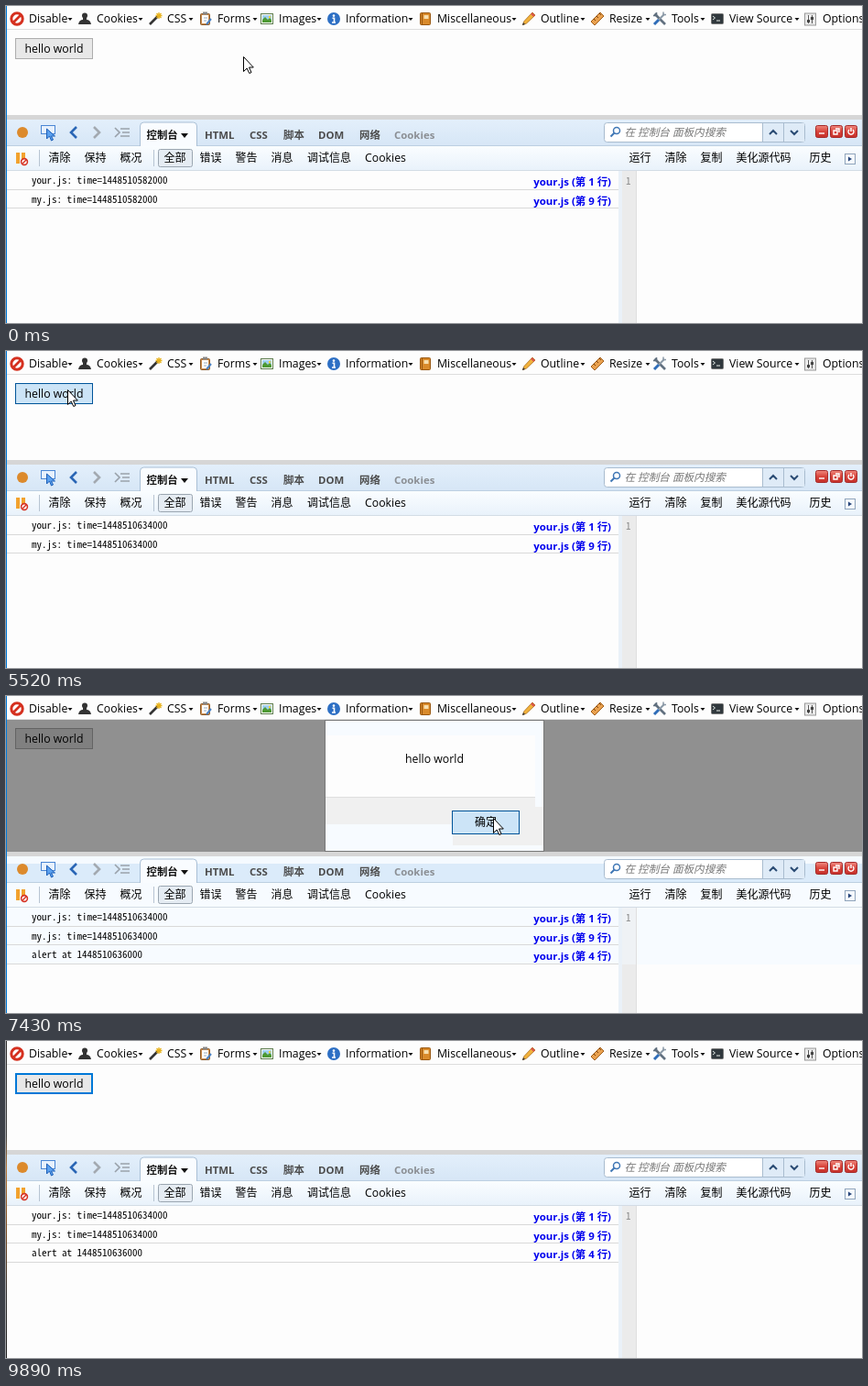
An HTML page that plays this animation: 935 by 346 pixels, repeating every 9990 ms.

```html
<!DOCTYPE html>
<html lang="zh-CN">
<head>
<meta charset="utf-8">
<title>Console demo</title>
<style>
html, body { margin: 0; width: 100%; height: 100%; overflow: hidden; background: #fdfdfd; }
svg { display: block; }
text { font: 12.3px "Open Sans", "Noto Sans CJK SC", "Noto Sans CJK", sans-serif; fill: #000; white-space: pre; }
.cjk { font-size: 12px; }
.tab { font-size: 11.4px; font-weight: 700; fill: #4c4c4c; }
.link { font-size: 11.45px; font-weight: 700; fill: #00e; text-anchor: end; }
.log { font: 11px "Noto Sans Mono CJK SC", "Noto Sans Mono", "Liberation Mono", monospace; font-size-adjust: ch-width .5; fill: #000; }
.hint { font-size: 11.6px; font-style: italic; fill: #777; }
.mid { text-anchor: middle; }
</style>
</head>
<body>
<script>
const LOOP = 9990, OPEN = 5650, CLOSE = 7550;

const text = (x, y, s, cls = '', attrs = '') => `<text x="${x}" y="${y}" class="${cls}" ${attrs}>${s}</text>`;
const rect = (x, y, w, h, fill, attrs = '') => `<rect x="${x}" y="${y}" width="${w}" height="${h}" fill="${fill}" ${attrs}/>`;
const path = (d, stroke, width = 1, fill = 'none') => `<path d="${d}" stroke="${stroke}" stroke-width="${width}" fill="${fill}"/>`;
const dot = (x, y, r, fill, attrs = '') => `<circle cx="${x}" cy="${y}" r="${r}" fill="${fill}" ${attrs}/>`;
const box = (x, y, w, h, fill, stroke, width = 1, r = 0) =>
  rect(x + width / 2, y + width / 2, w - width, h - width, fill, `stroke="${stroke}" stroke-width="${width}" rx="${r}"`);
const caret = (x, y, half = 2.5, drop = 3) => path(`M${x - half} ${y}h${half * 2}l${-half} ${drop}z`, 'none', 0, '#111');
const move = (x, y, s) => `<g transform="translate(${x} ${y})">${s}</g>`;
const at = (from, to, s) => `<g class="timed" data-from="${from}" data-to="${to}">${s}</g>`;
const gradient = (id, ...stops) => `<linearGradient id="${id}" x2="0" y2="1">` +
  stops.map(([o, c]) => `<stop offset="${o}" stop-color="${c}"/>`).join('') + '</linearGradient>';

// Toolbar icons are drawn around their own centre.
const icons = {
  disable: dot(0, 0, 6.2, '#fff', 'stroke="#d5301f" stroke-width="3"') + path('M-4 4L4-4', '#d5301f', 2.6),
  person: dot(0, -3.6, 3, '#333') + path('M-2-1h4v2q4 0 5 5H-7q1-5 5-5z', 'none', 0, '#333'),
  wand: path('M-6 6L3-3', '#333', 2.6) + path('M4-7v7M.5-3.5h7M1.5-6l5 5M6.5-6l-5 5', '#e8b21c', 1.3),
  clipboard: box(-6, -6, 11, 13, '#c98a4b', '#8a5a2b', 1, 1) + rect(-4, -4, 7, 9, '#fff') +
    rect(-3, -7.5, 5, 3, '#888') + path('M-2-1h4M-2 2h3', '#9ab', 1) + path('M1 6l5-6', '#4a82c3', 2),
  image: box(-7, -6, 14, 12, '#fff', '#5d7c4d') + rect(-5, -4, 10, 8, '#9fd0ef') +
    path('M-5 4v-3l3-3 3 3 2-2 2 2v3z', 'none', 0, '#4e9a34') + dot(3, -2, 1.2, '#f4d142'),
  info: dot(0, 0, 7, '#2d6fc4') + dot(0, -3.4, 1.3, '#fff') + path('M-1.5-.7h2V4M-2 4h4', '#fff', 1.6),
  book: box(-6, -7, 12, 14, '#d98a2b', '#98560f', 1, 1) + path('M-3.5-6.5v13', '#98560f') + rect(-1.5, -4, 5, 4, '#f8dfae'),
  pencil: path('M-6.5 6.5l1.5-4L4-7l3 3-9.5 9z', '#a86b18', .8, '#f2b23c') + path('M3-6l3 3', '#d9534a', 2.4) + path('M-7 7l1-3 2 2z', 'none', 0, '#333'),
  ruler: path('M-7 3L3-7l4 4L-3 7z', '#a05f1c', 1, '#e9a14f') + path('M-4 0l2 2M-1-3l2 2M2-6l2 2', '#7d430b', 1),
  tools: path('M-5.5-5.5L6 6', '#61707f', 2.6) + path('M5-5L-1 1', '#8a98a6', 2) + path('M-1 1l-5 5', '#2f6db8', 3) +
    path('M-7-3.5l3.5 0 0-3.5', '#61707f', 1.6) + path('M4-7.5l0 3 3 0', '#8a98a6', 1.5),
  terminal: box(-7, -6, 14, 12, '#30383d', '#777', 1, 1) + path('M-5-3l2.5 2-2.5 2M-1 2h4', '#e8eee8', 1),
  options: box(-7, -6.5, 13, 14, '#e9e9e9', '#999') + rect(-4, -3, 3, 8, '#fff') + path('M-2.5-4V5M1.5-4V5', '#555', 1) +
    rect(-4, 1, 3, 3, '#444') + rect(0, -2, 3, 3, '#444'),
};

const menu = [
  ['disable', 12, 'Disable', 70], ['person', 86, 'Cookies', 147], ['wand', 163, 'CSS', 202], ['clipboard', 218, 'Forms', 272],
  ['image', 285, 'Images', 342], ['info', 358, 'Information', 442], ['book', 458, 'Miscellaneous', 555], ['pencil', 571, 'Outline', 630],
  ['ruler', 646, 'Resize', 701], ['tools', 714, 'Tools', 761], ['terminal', 777, 'View Source', 864], ['options', 879, 'Options', 945],
].map(([icon, x, label, arrow]) =>
  move(x, 14, icons[icon]) + text(x + 13, 18, label) + caret(arrow, 13)).join('');

const pageButton = (fill, stroke, width) => box(10, 35, 85, 23, fill, stroke, width) + text(52.5, 51, 'hello world', 'mid');
const page =
  at(0, 4940, pageButton('#e8e8e8', '#adadad', 1)) +
  at(4940, 5520, pageButton('#e5f1fb', '#0078d7', 1)) +
  at(5520, OPEN, pageButton('#cce4f7', '#005499', 1)) +
  at(OPEN, CLOSE, pageButton('#e1e1e1', '#adadad', 1)) +
  at(CLOSE, LOOP, pageButton('#e8e8e8', '#0078d7', 2));

const loading =
  rect(1, 97, 668, 22, '#f0f0f0') + rect(1, 180, 668, 166, '#f0f0f0') +
  rect(1, 97, 264, 22, 'url(#status)') + path('M1 97.5H264.5V119', '#cdcdcd') +
  at(1260, 1560, text(5, 113, '正在等待 cdnjs.cloudflare.com...', 'cjk')) +
  at(1560, 3990, text(5, 113, '正在传输来自 cdnjs.cloudflare.com 的数据...', 'cjk'));

const logRow = (i, message, line) => {
  const offset = i * 20.5, y = Math.round(offset);
  return text(28, 194 + y, message, 'log') + text(661, 196 + y, `your.js (第 ${line} 行)`, 'link') +
    rect(1, 200 + Math.floor(offset), 668, 1, '#d9d9d9');
};
const loadRows = time => logRow(0, `your.js: time=${time}`, 1) + logRow(1, `my.js: time=${time}`, 9);

const tabs = [[217, 'HTML'], [266, 'CSS'], [303, '脚本'], [341, 'DOM'], [386, '网络']]
  .map(([x, s]) => text(x, 145, s, 'tab')).join('') + text(424, 145, 'Cookies', 'tab', 'style="fill:#8b8f94"');

const commands = [[47, '清除'], [86, '保持'], [125, '概况'], [173, '全部'], [212, '错误'], [251, '警告'], [290, '消息'], [329.5, '调试信息'],
  [681, '运行'], [720, '清除'], [759, '复制'], [798, '美化源代码'], [878, '历史']]
  .map(([x, s]) => text(x - .5, 170, s, 'cjk')).join('') + text(392, 170, 'Cookies');

const windowButtons = ['M-3 2h6', 'M-3-1h4v4h-4zM-1-3h4v4', 'M-2-2a3 3 0 1 0 4 0M0-4v4']
  .map((d, i) => move(891 + i * 16, 137, box(-7, -7, 14, 14, 'url(#red)', '#a52a2a', 1, 2) + path(d, '#fff', 1.4))).join('');

const navIcons =
  dot(18, 138, 6, '#dc8a2c') +
  box(38, 130, 16, 10, '#e7f1fd', '#4a86d4') + path('M44.5 134v11l3-3 2 5 2-1-2-4h4z', '#1d5fb8', 1, '#5ba0ee') +
  path('M77 132l-6 6 6 6', '#2a66b5', 2.6) + path('M96 132l6 6-6 6', '#a3a9b0', 2.6) +
  path('M119 133l5 5-5 5M125 134h10M127 138h8M125 142h10', '#9aa2ab', 1.7);

const pauseIcon = rect(11, 160, 4, 12, '#f2a22e') + rect(17, 160, 4, 8, '#f2a22e') +
  dot(20, 170, 3.4, '#fff', 'stroke="#d63324" stroke-width="1.6"') + path('M18 172l4-4', '#d63324', 1.4);

const search =
  box(653, 127, 220, 22, '#fff', '#a9bccf', 1, 3) + rect(827, 128, 45, 20, '#dfebf7') +
  path('M826.5 128v20M849.5 128v20', '#a9bccf') +
  dot(667, 136, 3.5, '#fff', 'stroke="#3f77b5" stroke-width="1.5"') + path('M664.5 138.5l-4 4', '#3f77b5', 2) +
  text(675.5, 142, '在 控制台 面板内搜索', 'hint') +
  path('M834 140l4-4 4 4M857 136l4 4 4-4', '#2b4c74', 2);

const panel =
  rect(1, 119, 934, 5, '#d6d6d6') + rect(1, 124, 934, 29, 'url(#tabbar)') + rect(1, 153, 934, 26, 'url(#toolbar)') +
  at(OPEN, CLOSE, rect(1, 124, 934, 8, '#f5faff') + rect(1, 132, 934, 20, '#dbebfa') + rect(1, 153, 934, 26, '#f7fbff')) +
  rect(1, 152, 934, 1, '#bccfe1') + rect(1, 179, 934, 1, '#d3dce5') +
  path('M146.5 153v-22q0-4 4-4h54q4 0 4 4v22', '#a9bfd5', 1, '#f9fcff') +
  text(153.5, 145, '控制台', 'tab', 'style="fill:#111"') + caret(195, 139, 4, 5) +
  navIcons + tabs + search + windowButtons + pauseIcon +
  path('M36.5 157v18M161.5 157v18', '#b7c4d2') + box(166, 156, 38, 20, '#e5ecf3', '#9ba6b1', 1, 2) + commands +
  box(916, 161, 12, 12, '#f4f8fd', '#8fa4bb') + path('M920 164.5v5l4-2.5z', 'none', 0, '#27457a') +
  text(677, 195, '1', 'log', 'style="fill:#888"') +
  at(0, 1260, loadRows('1448510582000')) + at(3990, LOOP, loadRows('1448510634000')) +
  at(OPEN, LOOP, logRow(2, 'alert at 1448510636000', 4));

const gutter = (y, h, fill) => rect(669, y, 4, h, '#eaf1f8') + rect(673, y, 15, h, fill) + rect(688, y, 1, h, '#dfdfdf');

// Parts of the dialog turn neutral where the pointer has passed.
const neutralArea = (from, x, y, w, h) => at(from, CLOSE,
  `<svg x="${x}" y="${y}" width="${w}" height="${h}" viewBox="${x} ${y} ${w} ${h}">` +
  rect(349, 27, 238, 83, '#fdfdfd') + rect(349, 110, 238, 59, '#f0f0f0') + rect(349, 110, 238, 1, '#dfdfdf') + '</svg>');
const okButton = (fill, stroke, width) => box(487, 125, 74, 26, fill, stroke, width) + text(524, 142, '确定', 'mid cjk');
const dialog =
  rect(1, 26, 934, 144, '#000', 'opacity=".43"') +
  box(348, 26, 240, 144, '#f7fbff', '#777') +
  neutralArea(6170, 349, 43, 229, 97) + neutralArea(6320, 566, 121, 21, 32) + neutralArea(6590, 488, 126, 99, 37) +
  text(468, 73, 'hello world', 'mid') +
  at(OPEN, 6590, okButton('#f5f9fd', '#0078d7', 2)) +
  at(6590, 7430, okButton('#e5f1fb', '#0078d7', 2)) +
  at(7430, CLOSE, okButton('#cce4f7', '#005499', 1));

const edge = at(0, 9890, rect(0, 0, 1, 346, '#0078d7')) + at(9890, LOOP, rect(0, 0, 1, 346, 'url(#edge)'));

const arrow = path('M.5.5V16.5L4.2 13L6.8 18.5L9 17.5L6.5 12H11.3z', '#000', 1, '#fff');
const beam = path('M0 .5h2.5l1 1 1-1H7M3.5 1v14M0 15.5h2.5l1-1 1 1H7', '#222');

document.body.innerHTML = `<svg width="935" height="346" viewBox="0 0 935 346"><defs>` +
  gradient('tabbar', [0, '#e3effb'], [1, '#d6e6f6']) + gradient('toolbar', [0, '#fafdff'], [1, '#e9f2fb']) +
  gradient('status', [0, '#f2f2f2'], [1, '#e4e4e4']) +
  gradient('red', [0, '#f08a80'], [.5, '#d8443b'], [1, '#c5302a']) +
  gradient('edge', [0, '#333'], [.3, '#444'], [.4, '#b87a3c'], [.6, '#7b4d24'], [.8, '#333'], [1, '#222']) + '</defs>' +
  rect(0, 0, 935, 346, '#fdfdfd') + gutter(180, 166, '#ebebeb') + rect(1, 25, 934, 1, '#dedede') + menu + page +
  at(1260, 3990, loading) +
  at(OPEN, CLOSE, rect(1, 170, 934, 123, '#f7fbff') + gutter(231, 62, '#eff2f5') + dialog) +
  `<g id="panel">${panel}</g>` + edge +
  `<g id="cursor">${at(0, 8780, arrow)}${at(8780, 9080, beam)}</g></svg>`;

const pointer = [
  [0, 259, 55], [3990, 257, 55], [4550, 190, 65], [4670, 110, 60], [4820, 82, 48], [4940, 67, 42],
  [6050, 290, 43], [6170, 566, 121], [6320, 629, 134], [6470, 592, 143], [6590, 557, 144],
  [6740, 546, 141], [6860, 537, 137], [6980, 533, 135], [7130, 532, 133],
  [7950, 556, 119], [8080, 582, 102], [8230, 631, 84], [8370, 668, 67],
  [8650, 722, 122], [8780, 781, 188], [8930, 806, 271],
];
const timed = [...document.querySelectorAll('.timed')];
const panelNode = document.getElementById('panel'), cursorNode = document.getElementById('cursor');
const start = performance.now();

function draw() {
  const t = (performance.now() - start) % LOOP;
  for (const node of timed) {
    node.style.display = t >= +node.dataset.from && t < +node.dataset.to ? '' : 'none';
  }
  panelNode.setAttribute('transform', `translate(0 ${t >= OPEN && t < CLOSE ? 51 : 0})`);
  const [, x, y] = pointer.findLast(step => step[0] <= t);
  cursorNode.setAttribute('transform', `translate(${x} ${y})`);
  requestAnimationFrame(draw);
}
draw();
</script>
</body>
</html>
```
